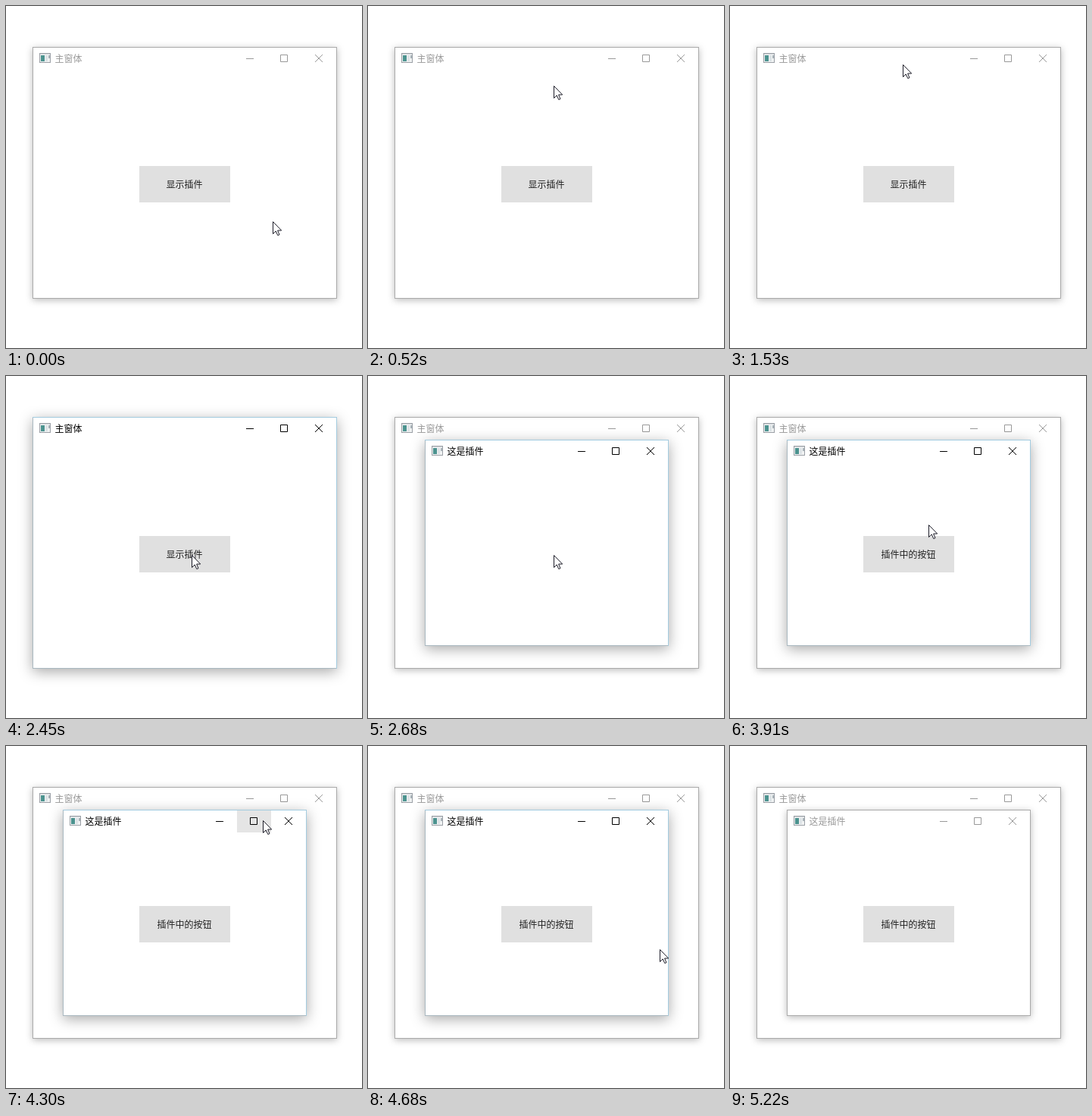
These frames come from a looping animation (470 px wide and 451 px high, 5.31 s). An HTML page:

```html
<!DOCTYPE html>
<html lang="zh">
<head>
<meta charset="utf-8">
<style>
html, body { margin: 0; width: 100%; height: 100%; overflow: hidden; background: #fff; }
svg { display: block; }
text { font: 12px "Noto Sans CJK SC", "Noto Sans CJK", "Noto Sans CJK JP", sans-serif; }
.frame { fill: #fff; filter: drop-shadow(0 2px 5px rgba(0,0,0,.27)); }
.edge, .controls { fill: none; stroke: #aaa; }
.controls { stroke: #999; }
.title { fill: #999; }
.glow { fill: none; stroke: none; }
.active .frame { filter: drop-shadow(0 4px 9px rgba(0,0,0,.34)); }
.active .edge { stroke: #a9b8c0; }
.active .glow { stroke: #a3cce0; }
.active .controls { stroke: #000; }
.active .title { fill: #000; }
</style>
</head>
<body>
<svg id="stage" width="470" height="451" viewBox="0 0 470 451"></svg>
<script>
const LOOP = 5310, STEP = 76.6;
const stage = document.getElementById('stage');

const windowMarkup = (id, x, y, w, h, title, label) => `
<g id="${id}" transform="translate(${x} ${y})">
  <rect class="frame" width="${w}" height="${h}"/>
  <rect class="edge" x=".5" y=".5" width="${w - 1}" height="${h - 1}"/>
  <path class="glow" d="M0 .5H${w - .5}V${h}"/>
  <g transform="translate(9 8)" shape-rendering="crispEdges">
    <rect width="15" height="13" fill="#9a9fa5"/>
    <rect x="1" y="2" width="13" height="10" fill="#f0f2f3"/>
    <rect x="1" y="1" width="13" height="1" fill="#d5d9dc"/>
    <rect x="2" y="3" width="5" height="8" fill="#4c938f"/>
    <rect x="8" y="3" width="3" height="8" fill="#dde3e6"/>
    <rect x="12" y="3" width="2" height="4" fill="#a9b4ba"/>
  </g>
  <text class="title" x="29.5" y="20">${title}</text>
  <rect class="hover" x="${w - 92}" y="1" width="45" height="29" fill="#e5e5e5" visibility="hidden"/>
  <path class="controls" d="M${w - 120} 15.5h10M${w - 74.5} 10.5h9v9h-9zM${w - 29} 10l10 10m0-10l-10 10"/>
  <g class="button" transform="translate(${176 - x} ${211 - y})">
    <rect width="120" height="48" fill="#e0e0e0"/>
    <text x="59.4" y="29" text-anchor="middle" fill="#222">${label}</text>
  </g>
</g>`;

stage.innerHTML =
  windowMarkup('main', 35, 54, 402, 332, '主窗体', '显示插件') +
  windowMarkup('plugin', 75, 84, 322, 272, '这是插件', '插件中的按钮') +
  '<path id="cursor" d="M.5.5V16.5L4.2 12.9 6.8 18.5 9 17.6 6.6 12H11.7Z" fill="#fff" stroke="#1c1c28"/>';

const [main, plugin, cursor] = ['main', 'plugin', 'cursor'].map(id => document.getElementById(id));
const hover = plugin.querySelector('.hover');
const button = plugin.querySelector('.button');

// Cursor strokes: first and last step time, end point, optional bend
const home = [352, 284];
const moves = [
  { from: 70, to: 600, end: [228, 80], bend: [252, 112] },
  { from: 1530, to: 1530, end: [228, 77] },
  { from: 2140, to: 2450, end: [245, 236], bend: [174, 150] },
  { from: 2760, to: 2910, end: [241, 211] },
  { from: 3140, to: 3140, end: [239, 220] },
  { from: 3220, to: 3300, end: [240, 230] },
  { from: 3910, to: 4300, end: [339, 98], bend: [310, 120] },
  { from: 4370, to: 4910, end: [455, 436], bend: [340, 180] },
  { from: 4990, to: 5070, end: [480, 460] }
];

// The pointer advances in equal hard steps along a quadratic curve
function cursorAt(t) {
  let start = home;
  for (const { from, to, end, bend } of moves) {
    if (t < from) break;
    const count = Math.round((to - from) / STEP) + 1;
    const done = Math.floor((t - from + 4) / STEP) + 1;
    const u = Math.min(1, done / count);
    start = start.map((a, i) => {
      const b = bend ? bend[i] : (a + end[i]) / 2;
      return Math.round((1 - u) ** 2 * a + 2 * u * (1 - u) * b + u * u * end[i]);
    });
  }
  return start;
}

const show = (node, on) => node.setAttribute('visibility', on ? 'inherit' : 'hidden');

function draw(t) {
  const [x, y] = cursorAt(t);
  cursor.setAttribute('transform', `translate(${x} ${y})`);
  main.classList.toggle('active', t >= 1990 && t < 2680);
  plugin.classList.toggle('active', t >= 2680 && t < 5220);
  show(plugin, t >= 2680);
  show(button, t >= 2760);
  show(hover, t >= 2680 && x >= 305 && x < 350 && y < 114);
}

const began = performance.now();
function tick() {
  draw((performance.now() - began) % LOOP);
  requestAnimationFrame(tick);
}
tick();
</script>
</body>
</html>
```
